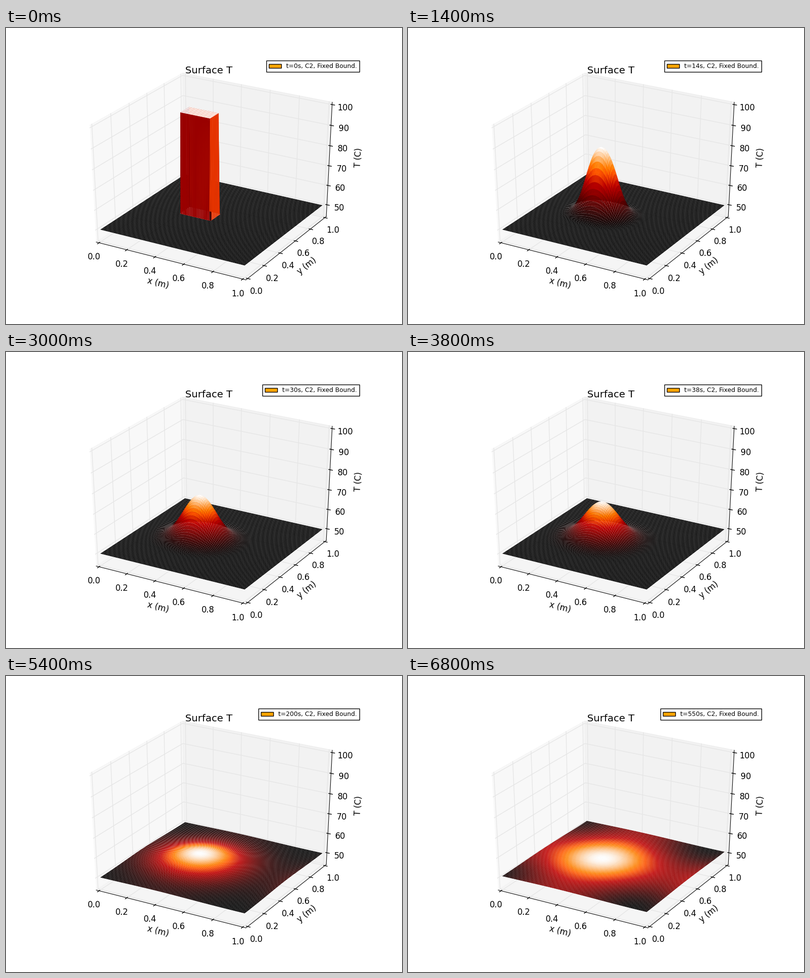
Recreate the animation shown at these times as a matplotlib script. Size 800x600 px, loop 7000 ms.

```python
import numpy as np
import matplotlib
import matplotlib.pyplot as plt
from matplotlib.animation import FuncAnimation
from matplotlib.collections import PathCollection
from matplotlib.patches import Patch, Polygon
from matplotlib.path import Path

FRAMES, INTERVAL = 35, 200
N = 100
Z_MIN, Z_MAX = 45, 100
LO, HI = -1 / 48, 1 + 1 / 48
DIST = 10

# Camera basis: elevation 30 degrees, azimuth -60 degrees
elev, azim = np.radians([30, -60])
NORMAL = np.array([np.cos(azim) * np.cos(elev),
                   np.sin(azim) * np.cos(elev), np.sin(elev)])
RIGHT = np.cross([0, 0, 1], NORMAL)
RIGHT /= np.linalg.norm(RIGHT)
UP = np.cross(NORMAL, RIGHT)


def project(points):
    """Unit-cube points to stage pixels (y up) and distance from the eye."""
    q = np.asarray(points, float) - 0.5
    w = DIST - q @ NORMAL
    x = 100 + 620 * (q @ RIGHT / w + 0.095) / 0.185
    y = 60 + 480 * (q @ UP / w + 0.095) / 0.185
    return np.stack([x, y], axis=-1), w


def unit_z(temp):
    return (temp - Z_MIN) / (Z_MAX - Z_MIN)


fig = plt.figure(figsize=(8, 6), dpi=100, facecolor="white")
ax = fig.add_axes([0, 0, 1, 1])
ax.set_xlim(0, 800)
ax.set_ylim(0, 600)
ax.axis("off")


def line(points, **style):
    xy, _ = project(points)
    ax.plot(xy[:, 0], xy[:, 1], **style)


def draw_pane(corners, grey):
    color = (grey, grey, grey, 0.5)
    ax.add_patch(Polygon(project(corners)[0], closed=False,
                         facecolor=color, edgecolor=color, lw=1))


def outward(edge, dims, amount):
    """Shift an edge point away from the cube centre along some dimensions."""
    p = np.array(edge, float)
    for d in dims:
        p[d] += np.sign(p[d] - 0.5) * amount / 12
    return p


def draw_axis(i, edge, tick_dim, ticks, labels, title):
    others = [d for d in range(3) if d != i]

    for t in ticks:
        corner = np.array([LO, HI, LO])
        corner[i] = t
        ends = []
        for d in others:
            p = corner.copy()
            p[d] = LO + HI - p[d]
            ends.append(p)
        line([ends[0], corner, ends[1]], color="0.9", lw=1)

    start, stop = np.array(edge, float), np.array(edge, float)
    start[i], stop[i] = LO, HI
    line([start, stop], color="k", lw=0.75)

    for t, label in zip(ticks, labels):
        p = np.array(edge, float)
        p[i] = t
        line([outward(p, [tick_dim], 0.2), outward(p, [tick_dim], -0.1)],
             color="k", lw=1)
        xy, _ = project(outward(p, others, 0.7))
        ax.text(*xy, label, size=12, ha="center", va="top")

    (dx, dy) = np.diff(project([start, stop])[0], axis=0)[0]
    xy, _ = project(outward(edge, others, 1.6))
    ax.text(*xy, title, size=12, ha="center", va="center",
            rotation=np.degrees(np.arctan2(dy, dx)))


draw_pane([(LO, LO, LO), (LO, HI, LO), (LO, HI, HI), (LO, LO, HI)], 0.95)
draw_pane([(LO, HI, LO), (HI, HI, LO), (HI, HI, HI), (LO, HI, HI)], 0.9)
draw_pane([(LO, LO, LO), (HI, LO, LO), (HI, HI, LO), (LO, HI, LO)], 0.925)

fractions = np.linspace(0, 1, 6)
fraction_labels = [f"{v:.1f}" for v in fractions]
temps = np.arange(50, 101, 10)
draw_axis(0, (0.5, LO, LO), 1, fractions, fraction_labels, "x (m)")
draw_axis(1, (HI, 0.5, LO), 0, fractions, fraction_labels, "y (m)")
draw_axis(2, (HI, HI, 0.5), 0, unit_z(temps), [str(v) for v in temps], "T (C)")
ax.text(410, 508.5, "Surface T", size=14.4, ha="center", va="baseline")

legend = ax.legend(
    handles=[Patch(facecolor="orange", edgecolor="k", lw=1, label="t=0s")],
    loc="upper right", bbox_to_anchor=(100, 60, 620, 480),
    bbox_transform=ax.transData, fontsize=9, fancybox=False,
    framealpha=1, edgecolor="k", borderaxespad=0.5)
legend.get_frame().set_linewidth(1)

# Heat diffusion on a periodic grid, solved mode by mode
block = np.zeros((N, N))
block[45:56, 30:51] = 50
modes = np.fft.fft2(block)
wave = 2 - 2 * np.cos(2 * np.pi * np.fft.fftfreq(N))
decay_rate = wave[:, None] + wave[None, :]

grid = np.linspace(0, 1, N)
X, Y = np.meshgrid(grid, grid)
heat = matplotlib.colormaps["gist_heat"]


def temperature(t):
    return 50 + np.fft.ifft2(modes * np.exp(-decay_rate * t)).real


def rings(a):
    """Closed outline of every grid cell, five points each."""
    cells = [a[:-1, :-1], a[:-1, 1:], a[1:, 1:], a[1:, :-1], a[:-1, :-1]]
    return np.stack(cells, axis=2).reshape(-1, 5, *a.shape[2:])


# The paths are views into this array, so refilling it moves the surface
quads = np.zeros(((N - 1) ** 2, 5, 2))
surface = PathCollection([Path(q) for q in quads], linewidths=0,
                         edgecolors="none", antialiaseds=True, zorder=3)
ax.add_collection(surface, autolim=False)


def seconds(k):
    return 2 * k if k < 24 else 50 * (k - 23)


def update(k):
    t = seconds(k)
    T = temperature(t)
    xy, w = project(np.stack([X, Y, unit_z(T)], axis=-1))
    order = np.argsort(rings(1 / w).mean(axis=1), kind="stable")
    quads[:] = rings(xy)[order]
    level = rings(T).mean(axis=1)[order]
    level = (level - level.min()) / (level.max() - level.min())
    surface.set_facecolor(heat(level))
    legend.get_texts()[0].set_text(f"t={t}s, C2, Fixed Bound.")
    return surface, legend


anim = FuncAnimation(fig, update, frames=FRAMES, interval=INTERVAL,
                     init_func=lambda: update(0), repeat=True,
                     repeat_delay=0, blit=False)
plt.show()
```
